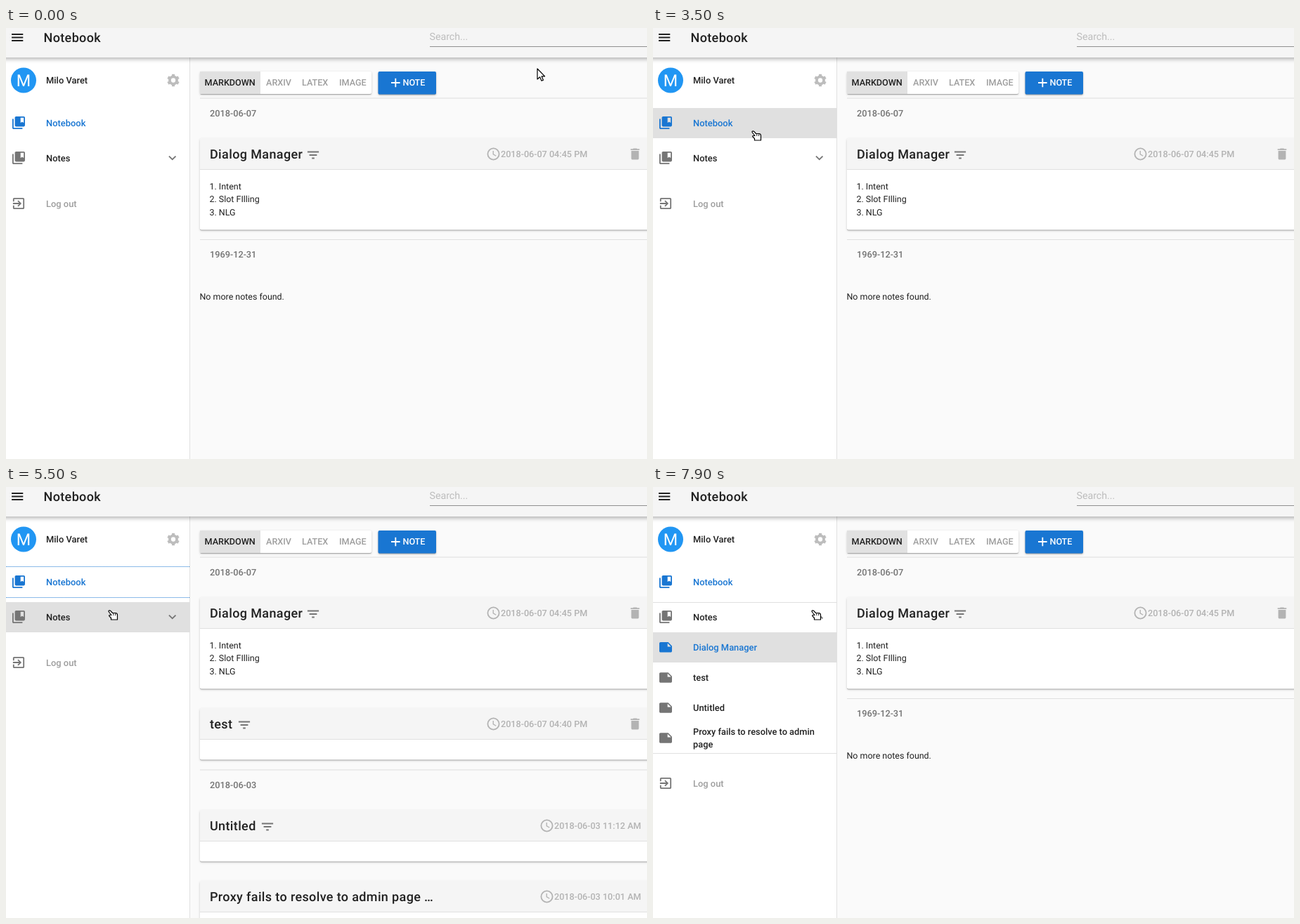
Animation of 912 by 614 pixels, one loop 8 s. Source, as an HTML page:

```html
<!DOCTYPE html>
<html lang="en">
<head>
<meta charset="utf-8">
<title>Notebook</title>
<style>
  html, body { margin: 0; width: 100%; height: 100%; overflow: hidden; background: #fafafa; }
  svg { display: block; }
  text { font-family: Roboto, sans-serif; font-weight: 500; text-rendering: geometricPrecision; white-space: pre; }
  .raised { filter: drop-shadow(0 1px .5px rgba(0,0,0,.22)) drop-shadow(0 1px 1.5px rgba(0,0,0,.2)); }
  .toolbar { filter: drop-shadow(0 2px 3px rgba(0,0,0,.32)); }
</style>
</head>
<body>
<svg id="stage" width="912" height="614" viewBox="0 0 912 614"></svg>
<script>
const LOOP = 8000, STEP = 100;
const INK = '#212121', GREY = '#757575', PALE = '#b3b3b3', LINE = '#e0e0e0', BLUE = '#1976d2';

const ICONS = {
  menu: 'M3 18h18v-2H3zM3 13h18v-2H3zM3 6v2h18V6z',
  books: 'M4 6H2v14c0 1.1.9 2 2 2h14v-2H4zM20 2H8c-1.1 0-2 .9-2 2v12c0 1.1.9 2 2 2h12c1.1 0 2-.9 2-2V4c0-1.1-.9-2-2-2zm0 10l-2.5-1.5L15 12V4h5z',
  exit: 'M10.1 15.6L11.5 17l5-5-5-5-1.4 1.4 2.6 2.6H3v2h9.7zM19 3H5c-1.1 0-2 .9-2 2v4h2V5h14v14H5v-4H3v4c0 1.1.9 2 2 2h14c1.1 0 2-.9 2-2V5c0-1.1-.9-2-2-2z',
  more: 'M16.6 8.6L12 13.2 7.4 8.6 6 10l6 6 6-6z',
  note: 'M22 10l-6-6H4c-1.1 0-2 .9-2 2v12c0 1.1.9 2 2 2h16c1.1 0 2-.9 2-2zm-7-4.5l5.5 5.5H15z',
  filter: 'M10 18h4v-2h-4zM3 6v2h18V6zM6 13h12v-2H6z',
  trash: 'M6 19c0 1.1.9 2 2 2h8c1.1 0 2-.9 2-2V7H6zM19 4h-3.5l-1-1h-5l-1 1H5v2h14z',
  add: 'M19 13h-6v6h-2v-6H5v-2h6V5h2v6h6z'
};
const HAND = 'M1.2 1.2Q2.5.2 4 1.6L6.5 4.5H11Q13.5 4.7 13.5 7.5V14H4.5V11.5L2 9Q1 7.5 2.8 7.5H5L1.4 3Q.6 2 1.2 1.2Z';
const ARROW = 'M0 0V15L3.6 11.8 6 17.2 8.4 16.2 6.1 10.8H10.6Z';

// Pointer path: time, x, y
const POINTER = [
  [100, 756, 58], [300, 738, 57], [500, 660, 72], [700, 585, 80], [1000, 557, 76], [1100, 563, 76],
  [1300, 563, 76], [1400, 561, 75], [2200, 561, 75], [2300, 556, 75], [2400, 228, 140], [2600, 228, 140],
  [2700, 150, 180], [3200, 150, 180], [3500, 140, 146], [4900, 140, 146], [5300, 145, 175],
  [6100, 145, 175], [6500, 141, 221], [6600, 139, 220], [7700, 139, 220], [7900, 225, 175]
];

const ramp = (t, a, b) => Math.min(1, Math.max(0, (t - a) / (b - a)));
const ease = p => p * p * (3 - 2 * p);
const pulse = (t, inA, inB, outA, outB) => ramp(t, inA, inB) - ramp(t, outA, outB);

const rect = (x, y, w, h, fill, extra = '') =>
  `<rect x="${x}" y="${y}" width="${w}" height="${h}" fill="${fill}" ${extra}/>`;
const text = (x, y, str, fill = INK, size = 12.9, extra = '') =>
  `<text x="${x}" y="${y}" fill="${fill}" font-size="${size}" ${extra}>${str}</text>`;
const plain = (x, y, str, fill = INK, size = 12.45) => text(x, y, str, fill, size, 'style="font-weight:400"');
const title = (x, y, str) => text(x, y, str, INK, 18, 'letter-spacing=".36"');
const icon = (name, cx, cy, fill = GREY, turn = 0) =>
  `<path d="${ICONS[name]}" fill="${fill}" transform="translate(${cx} ${cy}) rotate(${turn}) scale(.9) translate(-12 -12)"/>`;
const rule = (x, y, w) => rect(x, y, w, 1, LINE);

function gear(cx, cy, color) {
  let teeth = '';
  for (let a = 30; a < 390; a += 60) teeth += `<path d="M5.5 0H9.7" stroke-width="4.6" transform="rotate(${a})"/>`;
  return `<g transform="translate(${cx} ${cy}) scale(.9)" fill="none" stroke="${color}">
    <circle r="5.6" stroke-width="4.2"/>${teeth}</g>`;
}

const clock = (cx, cy) => `<g transform="translate(${cx} ${cy}) scale(.9)" fill="none" stroke="${PALE}">
  <circle r="9" stroke-width="2"/><path d="M-.3-5V.4L4.2 3.1" stroke-width="1.5"/></g>`;

function card(y, height, name, time, { filterX, timeX = 704, trash = true, opacity = 1 } = {}) {
  return `<g opacity="${opacity}"><g class="raised">${rect(276, y, 660, height, '#fff', 'rx="2"')}</g>
    ${rect(276, y, 660, 44, '#f5f5f5')}${rule(276, y + 43.5, 660)}
    ${title(290, y + 28.5, name)}${filterX ? icon('filter', filterX, y + 23.5) : ''}
    ${clock(timeX - 10.5, y + 22)}${text(timeX, y + 26.5, time, PALE, 12.65)}
    ${trash ? icon('trash', 895, y + 22, PALE) : ''}</g>`;
}

const dateRow = (y, str) => rule(276, y, 636) + text(290, y + 26, str, '#737373', 12.75);

function ripple(t, start, cx, cy, rowY, color) {
  if (t < start || t > start + 800) return '';
  const opacity = .14 * (1 - ramp(t, start + 300, start + 800));
  return `<svg y="${rowY}" width="261" height="43"><circle cx="${cx}" cy="${cy - rowY}"
    r="${67.5 + (t - start) * .8}" fill="${color}" opacity="${opacity}"/></svg>`;
}

function feed(t) {
  const hover = .12 * pulse(t, 600, 1000, 2600, 2700);
  const tabs = [[370, 'ARXIV'], [421, 'LATEX'], [474, 'IMAGE']];
  let out = `<g class="raised">${rect(276, 62, 244, 32, '#fff', 'rx="2"')}</g>
    ${rect(276, 62, 86, 32, '#e1e1e1')}${text(282.5, 81.5, 'MARKDOWN', INK, 12.6)}
    ${tabs.map(([x, s]) => text(x, 81.5, s, '#9e9e9e', 12.6)).join('')}
    <g class="raised">${rect(529.5, 62, 82.5, 32.5, BLUE, 'rx="2"')}</g>
    ${rect(529.5, 62, 82.5, 32.5, '#fff', `rx="2" opacity="${hover}"`)}
    ${icon('add', 554.3, 78, '#fff')}${text(564.5, 82.3, 'NOTE', '#fff', 12.6)}
    ${dateRow(99.5, '2018-06-07')}
    ${card(157.5, 130, 'Dialog Manager', '2018-06-07 04:45 PM', { filterX: 437 })}
    ${['1. Intent', '2. Slot FIlling', '3. NLG'].map((s, i) => plain(289.5, 229.5 + i * 18.8, s)).join('')}`;
  if (t >= 4000 && t < 7400) {
    out += card(315.5, 73, 'test', '2018-06-07 04:40 PM', { filterX: 339, opacity: ramp(t, 3900, 4500) })
      + dateRow(402.5, '2018-06-03')
      + card(460.5, 73, 'Untitled', '2018-06-03 11:12 AM', { filterX: 372, timeX: 780, trash: false })
      + card(561.5, 73, 'Proxy fails to resolve to admin page …', '2018-06-03 10:01 AM', { timeX: 780, trash: false });
  } else {
    out += dateRow(301, '1969-12-31') + plain(275.5, 387.2, 'No more notes found.');
  }
  return out;
}

function sidebar(t) {
  const open = ease(ramp(t, 5700, 6100)), drop = 172 * open;
  const row = (cy, name, str, color = INK, iconColor = GREY) =>
    icon(name, 18, cy, iconColor) + text(57, cy + 4.7, str, color);
  const glow = (y, amount) => rect(0, y, 261, 43, LINE, `opacity="${amount}"`);
  const picked = t >= 7400;
  const focus = t >= 5000 && t < 5700
    ? `<path d="M0 113.5H261M0 157.5H261" stroke="${BLUE}" stroke-dasharray="1 1"/>` : '';
  const notesHover = pulse(t, 2600, 2700, 3200, 3500) + pulse(t, 5400, 5500, 6100, 6400);

  return `${rect(0, 42, 261, 572, '#fff')}
    <circle cx="25" cy="74.5" r="18" fill="#2196f3"/>${plain(14.8, 82.8, 'M', '#fff', 23.4)}
    ${text(57, 79, 'Milo Varet')}${gear(238, 74.5, '#bdbdbd')}
    ${glow(114, pulse(t, 3200, 3500, 4900, 5300))}${ripple(t, 3700, 144, 149, 114, BLUE)}
    ${focus}${row(135, 'books', 'Notebook', BLUE, BLUE)}
    ${glow(164, notesHover)}${ripple(t, 5700, 149, 178, 164, '#000')}
    ${row(185, 'books', 'Notes')}${icon('more', 236.7, 185, GREY, 180 * open)}
    <g opacity="${open}">${rule(0, 164, 261)}${rule(0, 207 + drop, 261)}</g>
    <svg width="261" height="${207 + drop}">
      ${glow(207, ramp(t, 6200, 6500))}${ripple(t, 7100, 144.5, 223, 207, '#000')}
      ${drop ? row(228.3, 'note', 'Dialog Manager', picked ? BLUE : INK, picked ? BLUE : GREY)
        + row(271.5, 'note', 'test') + row(314.5, 'note', 'Untitled') + icon('note', 18, 357.5)
        + text(57, 352.5, 'Proxy fails to resolve to admin', INK, 12.8) + text(57, 371, 'page', INK, 12.8) : ''}
    </svg>
    ${row(250 + drop, 'exit', 'Log out', '#9e9e9e')}
    ${rect(261, 42, 1, 572, LINE)}`;
}

const toolbar = `<g class="toolbar">${rect(-10, -10, 932, 52, '#f5f5f5')}</g>
  ${icon('menu', 16.2, 13.5, INK)}${title(53.5, 19.8, 'Notebook')}
  ${plain(602.5, 17.2, 'Search...', '#bdbdbd', 14.2)}${rect(603, 26, 309, 1, '#909090')}`;

function pointer(t) {
  const next = POINTER.findIndex(k => k[0] > t);
  const b = POINTER[next < 0 ? POINTER.length - 1 : next];
  const a = POINTER[next < 0 ? POINTER.length - 1 : Math.max(0, next - 1)];
  const p = a === b ? 0 : ramp(t, a[0], b[0]);
  const x = a[1] + (b[1] - a[1]) * p, y = a[2] + (b[2] - a[2]) * p;
  const hand = x < 612;
  return `<g transform="translate(${x} ${y})" fill="#fff" stroke="#000" stroke-width="1.2" stroke-linejoin="round">
    <path d="${hand ? HAND : ARROW}"/>${hand ? '<path d="M7.8 5V8M10.6 5.2V8" stroke-width=".9"/>' : ''}</g>`;
}

const stage = document.getElementById('stage');
let shown = -1;
function tick() {
  const t = Math.floor(performance.now() % LOOP / STEP) * STEP;
  if (t !== shown) {
    stage.innerHTML = feed(t) + sidebar(t) + toolbar + pointer(t);
    shown = t;
  }
  requestAnimationFrame(tick);
}
tick();
</script>
</body>
</html>
```
